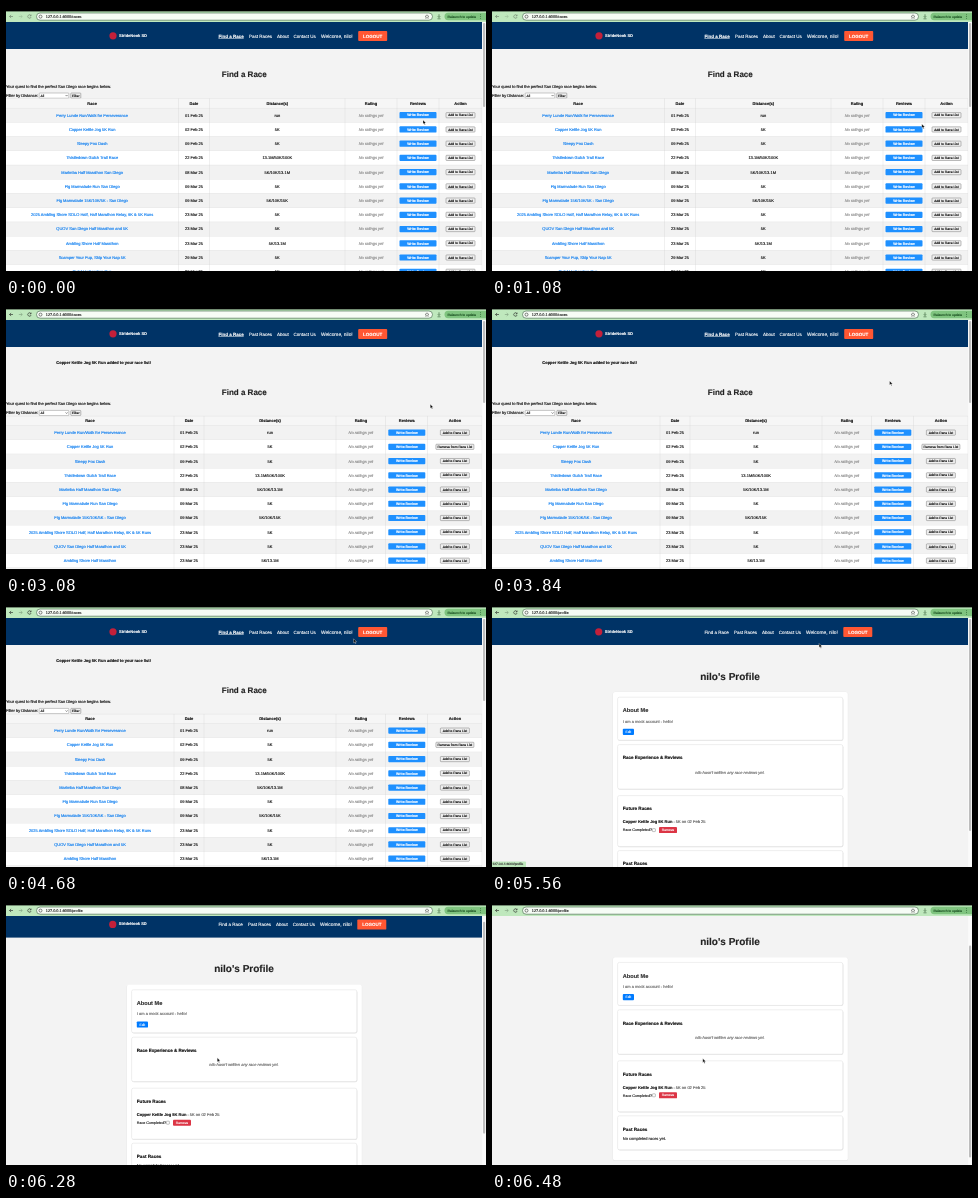
Write an HTML page that moves like this. It is 480 px wide and 270 px high and loops after 6.96 s.

```html
<!DOCTYPE html>
<html lang="en">
<head>
<meta charset="utf-8">
<title>Race finder</title>
<style>
html, body { margin: 0; width: 100%; height: 100%; overflow: hidden; background: #000; }
svg { display: block; width: 100vw; height: 100vh; }
text { font-family: "Liberation Sans", Arial, sans-serif; text-rendering: geometricPrecision; white-space: pre; }
</style>
</head>
<body>
<svg id="stage" viewBox="0 0 480 270"></svg>
<script>
const LOOP = 6960;
const NS = "http://www.w3.org/2000/svg";
const USER = "nilo";
const PICK = "Copper Kettle Jog 5K Run";
const stage = document.getElementById("stage");

function add(parent, tag, attrs = {}) {
  const el = document.createElementNS(NS, tag);
  for (const k in attrs) el.setAttribute(k, attrs[k]);
  parent.appendChild(el);
  return el;
}
const group = (p, attrs) => add(p, "g", attrs);
const rect = (p, x, y, w, h, fill, more) =>
  add(p, "rect", { x, y, width: w, height: h, fill, ...more });
const path = (p, d, stroke, width = 0.6) =>
  add(p, "path", { d, stroke, fill: "none", "stroke-width": width });

// y is the vertical middle of the capitals; the thin stroke thickens small type
function text(p, str, x, y, size = 4, fill = "#111", more = {}) {
  const el = add(p, "text", {
    x, y: y + size * 0.36, "font-size": size, fill, stroke: fill, "stroke-width": 0.14, ...more
  });
  el.textContent = str;
  return el;
}
const BOLD = { "font-weight": 700 };
const MID = { "text-anchor": "middle" };
const BOLD_MID = { ...BOLD, ...MID };
const ITALIC_MID = { ...MID, "font-style": "italic" };

function button(p, label, cx, cy, w, h, fill, more = MID, size = 3.33) {
  rect(p, cx - w / 2, cy - h / 2, w, h, fill, { rx: 0.9 });
  text(p, label, cx, cy, size, "#fff", more);
}
function plainButton(p, label, cx, cy, w) {
  rect(p, cx - w / 2, cy - 2.6, w, 5.2, "#efefef",
    { rx: 0.7, stroke: "#6b6b6b", "stroke-width": 0.45 });
  text(p, label, cx, cy, 3.33, "#000", MID);
}

function navBar(p, onRaces) {
  const dx = onRaces ? 0 : -0.9;
  rect(p, 0, 16, 476, 27, "#003366");
  add(p, "circle", { cx: 107 + dx * 0.3, cy: 29.8, r: 3.6, fill: "#c4203a" });
  text(p, "StrideNook SD", 113 + dx * 0.3, 29.3, 4, "#fff", BOLD);
  text(p, "Find a Race", 212.4, 30, 4.5, "#fff", onRaces ? BOLD : {});
  if (onRaces) rect(p, 212.4, 32.2, 25.3, 0.5, "#fff");
  text(p, "Past Races", 243 + dx, 30, 4.5, "#fff");
  text(p, "About", 271 + dx, 30, 4.5, "#fff");
  text(p, "Contact Us", 287.6 + dx, 30, 4.5, "#fff");
  text(p, `Welcome, ${USER}!`, 315 + dx, 30, 4.85, "#fff");
  button(p, "LOGOUT", 366.7 + dx, 30, 29, 10, "#ff5733", BOLD_MID, 4.5);
}

const races = [
  ["Perry Lunde Run/Walk for Perseverance", "01 Feb", "run"],
  [PICK, "02 Feb", "5K"],
  ["Sleepy Fox Dash", "09 Feb", "5K"],
  ["Thistledown Gulch Trail Race", "22 Feb", "13.1M/50K/100K"],
  ["Marimba Half Marathon San Diego", "08 Mar", "5K/10K/13.1M"],
  ["Fig Marmalade Run San Diego", "09 Mar", "5K"],
  ["Fig Marmalade 15K/10K/5K - San Diego", "09 Mar", "5K/10K/15K"],
  ["2025 Ambling Shore SOLO Half, Half Marathon Relay, 9K & 5K Runs", "23 Mar", "5K"],
  ["QUOV San Diego Half Marathon and 5K", "23 Mar", "5K"],
  ["Ambling Shore Half Marathon", "23 Mar", "5K/13.1M"],
  ["Scamper Your Pup, Skip Your Nap 5K", "29 Mar", "5K"],
  ["Quiet Harbor Fun Run", "29 Mar", "5K"]
];
const heads = ["Race", "Date", "Distance(s)", "Rating", "Reviews", "Action"];

function racePage(p, added) {
  const top = added ? 19.4 : 0;
  const cols = added ? [0, 168, 198, 330, 379.8, 421.8, 476] : [0, 172.3, 203.6, 339, 391, 433, 476];
  const mid = i => (cols[i] + cols[i + 1]) / 2;
  rect(p, 0, 16, 476, 250, "#f3f3f3");
  navBar(p, true);
  if (added) text(p, PICK + " added to your race list!", 50.3, 58.2, 4, "#111", BOLD);

  const g = group(p, { transform: `translate(0 ${top})` });
  text(g, "Find a Race", 238.3, 68.4, 8, "#222", BOLD_MID);
  text(g, "Your quest to find the perfect San Diego race begins below.", 0, 80.6);
  text(g, "Filter by Distance:", 0, 89.6);
  rect(g, 33.2, 87, 29.6, 5.2, "#fff", { rx: 0.6, stroke: "#777", "stroke-width": 0.4 });
  text(g, "All", 34.6, 89.6, 3.33);
  path(g, "M59.6 89l1 1.1l1-1.1", "#222", 0.5);
  plainButton(g, "Filter", 69.8, 89.6, 10);

  rect(g, 0, 92.7, 476, 9.4, "#f6f6f6");
  heads.forEach((h, i) => text(g, h, mid(i), 97.4, 4, "#111", BOLD_MID));
  const step = 14.23;
  races.forEach(([name, day, dist], i) => {
    const y = 102.1 + i * step, c = y + step / 2;
    rect(g, 0, y, 476, step, i % 2 ? "#fff" : "#f2f2f2");
    rect(g, 0, y - 0.15, 476, 0.3, "#d8d8d8");
    text(g, name, mid(0), c, 4, "#0a7cf0", MID);
    text(g, day + " 25", mid(1), c, 4, "#111", MID);
    text(g, dist, mid(2), c, 4, "#111", MID);
    text(g, "No ratings yet", mid(3), c, 4, "#888", ITALIC_MID);
    button(g, "Write Review", mid(4), c, 37, 6.2, "#1e90ff", BOLD_MID, 3.5);
    const mine = added && i === 1;
    plainButton(g, mine ? "Remove from Race List" : "Add to Race List", mid(5), c, mine ? 38 : 29);
  });
  rect(g, 0, 92.5, 476, 0.3, "#d8d8d8");
  cols.slice(1).forEach(x => rect(g, x - 0.15, 92.5, 0.3, 190, "#ccc"));
}

function card(p, y, h, title, size, fill) {
  rect(p, 126, y + 0.7, 225.4, h, "#000", { rx: 2, opacity: 0.1 });
  rect(p, 125.6, y, 225.2, h, "#fff", { rx: 1.8, stroke: "#dedede", "stroke-width": 0.5 });
  text(p, title, 130.8, y + 13.2, size, fill, BOLD);
}

function profilePage(p) {
  rect(p, 0, 16, 476, 283, "#f3f3f3");
  navBar(p, false);
  text(p, USER + "'s Profile", 238, 74.2, 10, "#222", BOLD_MID);
  rect(p, 120.6, 89.8, 235.6, 204, "#000", { rx: 2.5, opacity: 0.05 });
  rect(p, 121, 90, 234.8, 203, "#fff", { rx: 2 });

  card(p, 95.2, 43, "About Me", 5.6, "#333");
  text(p, "I am a mock account - hello!", 130.8, 119.2, 4, "#666");
  button(p, "Edit", 136.4, 129.9, 11.2, 6.2, "#007bff");

  card(p, 142.6, 44.4, "Race Experience & Reviews", 4.5);
  text(p, USER + " hasn't written any race reviews yet.", 238, 170.2, 4, "#666", ITALIC_MID);

  card(p, 193.6, 51, "Future Races", 4.6);
  text(p, PICK, 130.8, 219.9, 4, "#111", BOLD);
  text(p, "- 5K on 02 Feb 25", 181.4, 219.9, 4, "#555");
  text(p, "Race Completed?", 130.8, 228.1, 3.65, "#222");
  rect(p, 160.4, 226.6, 3, 3, "#fff", { rx: 0.5, stroke: "#666", "stroke-width": 0.4 });
  button(p, "Remove", 176, 228.1, 18, 6, "#dc3545");

  card(p, 248.6, 34, "Past Races", 4.6);
  text(p, "No completed races yet.", 130.8, 271, 4, "#222");
}

// Browser window
const clip = add(add(stage, "defs"), "clipPath", { id: "view" });
rect(clip, 0, 16, 480, 249, "#fff");
rect(stage, 0, 0, 480, 270, "#000");
rect(stage, 0, 5.4, 480, 10.6, "#bfe8bd");
rect(stage, 30.5, 7, 396, 7.2, "#f6fcf5", { rx: 3.6, stroke: "#3c5f42", "stroke-width": 0.6 });
add(stage, "circle", { cx: 34.5, cy: 10.6, r: 1.5, fill: "none", stroke: "#333", "stroke-width": 0.6 });
const url = text(stage, "", 39.8, 10.5, 3.8, "#222");
path(stage, "M421 8.7l.6 1.3l1.4.1l-1.1.9l.4 1.4l-1.3-.8l-1.3.8l.4-1.4l-1.1-.9l1.4-.1z", "#333", 0.4);
path(stage, "M433 8.3v3M431.8 10.3l1.2 1.2l1.2-1.2M431.5 12.8h3", "#2c5530");
rect(stage, 438.5, 6.8, 45, 7.4, "#7fc47f", { rx: 3.7 });
text(stage, "Relaunch to update", 441.6, 10.5, 3.3, "#184d1f");
[8.8, 10.5, 12.2].forEach(cy => add(stage, "circle", { cx: 474.6, cy, r: 0.45, fill: "#184d1f" }));

const tools = group(stage);
path(tools, "M7 10.5h-3.4M5.1 9l-1.6 1.5l1.6 1.5", "#222");
path(tools, "M12.8 10.5h3.4M14.7 9l1.6 1.5l-1.6 1.5", "#7c9a7c");
const reload = path(tools, "M24.9 9.6a1.7 1.7 0 1 0 .2 1.4M25.1 8.6v1.3h-1.3", "#222");
const stop = path(tools, "M22.2 9.1l2.8 2.8M25 9.1l-2.8 2.8", "#222");

const view = group(stage, { "clip-path": "url(#view)" });
rect(view, 0, 16, 480, 250, "#f3f3f3");
const pages = [0, 1, 2].map(() => group(view));
racePage(pages[0], false);
racePage(pages[1], true);
profilePage(pages[2]);
rect(view, 476.2, 16, 4, 249, "#fafafa");
const thumb = rect(view, 477, 17, 2.2, 84, "#bdbdbd", { rx: 1.1 });

const status = group(view);
rect(status, -1, 259.4, 35, 6, "#bfe8bd", { rx: 0.8 });
text(status, "127.0.0.1:8000/profile", 0.5, 262, 3.2, "#333");

const cursor = add(stage, "path", {
  d: "M0 0V4.1L1 3.2L1.7 4.8L2.4 4.5L1.7 3H3Z",
  fill: "#000", stroke: "#fff", "stroke-width": 0.35
});

// time, x, y of the pointer tip
const track = [
  [0, 417, 114], [520, 417, 114], [1220, 433, 119], [1920, 448.3, 121.7],
  [2240, 448.3, 121.7], [3080, 424.3, 100.3], [4000, 392, 72], [4280, 392, 72],
  [4680, 347.6, 36.8], [4880, 337, 34.5], [5000, 337, 34.5], [5160, 330.5, 30],
  [5480, 330.5, 30], [5560, 327.3, 41.3], [6160, 211.5, 157.4], [6480, 210.8, 158.6],
  [LOOP, 210.8, 158.6]
];
function pointer(t) {
  const i = track.findIndex(k => k[0] > t);
  const a = track[i - 1], b = track[i];
  const u = (t - a[0]) / (b[0] - a[0]);
  return [a[1] + (b[1] - a[1]) * u, a[2] + (b[2] - a[2]) * u];
}
function smooth(t, from, to) {
  const u = Math.min(1, Math.max(0, (t - from) / (to - from)));
  return u * u * (3 - 2 * u);
}
const show = (el, on) => el.setAttribute("display", on ? "inline" : "none");

function draw(t) {
  const page = t < 2240 ? 0 : t < 5320 ? 1 : 2;
  const scroll = 32.8 * smooth(t, 6212, 6480);
  pages.forEach((p, i) => show(p, i === page));
  pages[2].setAttribute("transform", `translate(0 ${-scroll})`);
  thumb.setAttribute("y", 17 + scroll * 0.87);
  thumb.setAttribute("height", [84, 82, 212][page]);
  url.textContent = "127.0.0.1:8000/" + (page < 2 ? "races" : "profile");
  const loading = (t >= 1960 && t < 2240) || (t >= 5200 && t < 5320);
  show(reload, !loading);
  show(stop, loading);
  tools.setAttribute("opacity", t < 1240 ? 0.55 : 1);
  show(status, t >= 5080 && t < 5720);
  cursor.setAttribute("transform", `translate(${pointer(t)})`);
}
function tick() {
  draw(performance.now() % LOOP);
  requestAnimationFrame(tick);
}
tick();
</script>
</body>
</html>
```
